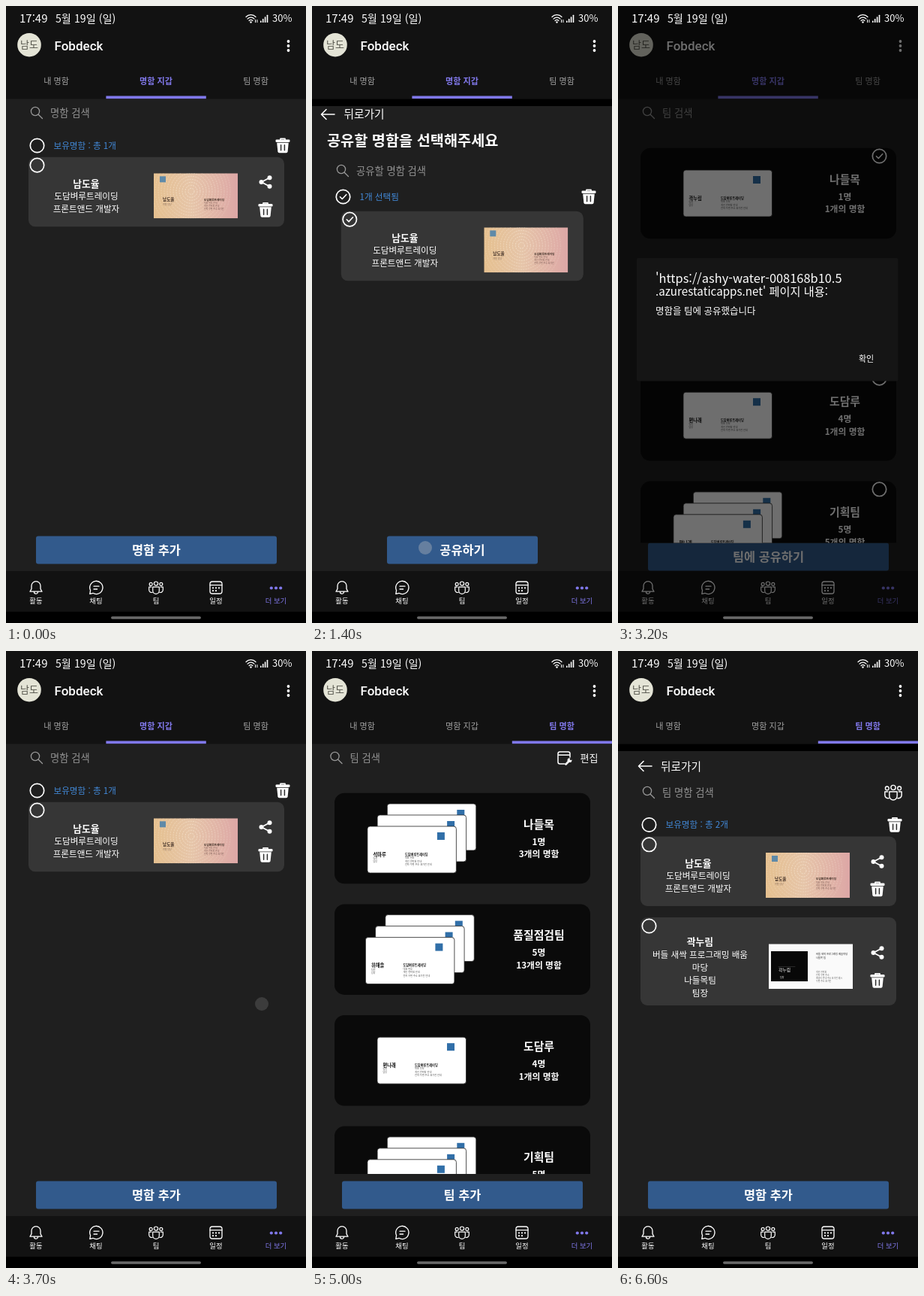
Write an HTML page that moves like this. It is 400x820 px and loops after 6.7 s.

```html
<!DOCTYPE html>
<html lang="ko">
<head>
<meta charset="utf-8">
<title>명함 지갑</title>
<style>
html, body { margin: 0; width: 100%; height: 100%; overflow: hidden; background: #1f1f1f; }
svg { display: block; }
text { font-family: "Noto Sans CJK KR", "Noto Sans CJK", "Noto Sans", sans-serif; white-space: pre; }
.latin { font-family: Roboto, "Noto Sans", sans-serif; }
</style>
</head>
<body>
<svg id="stage" width="400" height="820" viewBox="0 0 400 820"></svg>
<script>
const LOOP = 6700, STEP = 100;
const VIOLET = '#8078ea', BLUE = '#4289d8', GREY = '#929292', PAGE = '#1f1f1f', BAR = '#121212';
const COMPANY = '도담벼루트레이딩', OWNER = '남도율', LEAD = '곽누림';

// ---- drawing helpers (text y is the vertical middle) ----
const text = (x, y, s, size, { fill = '#fff', weight = 400, anchor = 'start', cls = '' } = {}) =>
  `<text x="${x}" y="${y + size * 0.36}" font-size="${size}" fill="${fill}" font-weight="${weight}" text-anchor="${anchor}" class="${cls}">${s}</text>`;
const mid = (x, y, s, size, o = {}) => text(x, y, s, size, { anchor: 'middle', ...o });
const rect = (x, y, w, h, fill, r = 0, more = '') =>
  `<rect x="${x}" y="${y}" width="${w}" height="${h}" rx="${r}" fill="${fill}" ${more}/>`;
const disc = (x, y, r, fill = '#fff') => `<circle cx="${x}" cy="${y}" r="${r}" fill="${fill}"/>`;
const line = (d, width = 1.5, color = '#fff') =>
  `<path d="${d}" fill="none" stroke="${color}" stroke-width="${width}" stroke-linecap="round" stroke-linejoin="round"/>`;
const at = (x, y, body, scale = 1) => `<g transform="translate(${x} ${y}) scale(${scale})">${body}</g>`;
const group = (id, body) => `<g id="${id}" display="none">${body}</g>`;

// ---- icons, centred on 0,0 ----
const radio = (x, y, on) => at(x, y,
  `<circle r="9.2" fill="none" stroke="#fff" stroke-width="1.7"/>` + (on ? line('M-4 .2L-1.2 3L4.2-2.8', 1.6) : ''));
const trash = (x, y) => at(x, y,
  line('M-3-8V-9.2H3V-8', 1.7) + rect(-9.5, -8, 19, 3.6, '#fff', 1.3) +
  '<path d="M-7.8-3.8H7.8L6.6 8Q6.4 9.7 4.6 9.7H-4.6Q-6.4 9.7-6.6 8Z" fill="#fff"/>' +
  line('M-2.4-.8V6.3M2.4-.8V6.3', 1.5, '#2b2b2b'));
const share = (x, y) => at(x, y,
  line('M5.5-5.7L-5.5 0L5.5 5.7', 1.8) + disc(5.5, -5.7, 3) + disc(-5.5, 0, 3) + disc(5.5, 5.7, 3));
const lens = (x, y) => at(x, y, '<circle cx="-1.5" cy="-1.5" r="5.6" fill="none" stroke="#989898" stroke-width="1.3"/>' +
  line('M2.7 2.7L8 8', 1.3, '#989898'));
const arrow = (x, y) => at(x, y, line('M9 0H-8.5M-2-6.5L-8.5 0L-2 6.5', 1.6));
const people = (x, y, scale = 1) => at(x, y,
  [-6.8, 0, 6.8].map(c => `<circle cx="${c}" cy="${c ? -4.6 : -5.4}" r="${c ? 2 : 2.6}" fill="none" stroke="#fff" stroke-width="1.2"/>`).join('') +
  line('M-4.3-.8H4.3V4A4.3 4.3 0 0 1-4.3 4ZM-6.2-.8H-9.3V3A3.6 3.6 0 0 0-5 6.4M6.2-.8H9.3V3A3.6 3.6 0 0 1 5 6.4', 1.2), scale);
const bell = at(40, 773, line('M-8 5.2H8L6 1.6V-2.4A6 6 0 0 0-6-2.4V1.6ZM-2.6 5.5A2.6 2.6 0 0 0 2.6 5.5', 1.3));
const chat = at(120, 773, line('M-8.2 8.4L-7.4 3.6A8.6 8.6 0 1 1-4 7.3ZM-3-1.8H4M-3 2H1.6', 1.3));
const calendar = at(280, 773, '<rect x="-8" y="-8" width="16" height="16" rx="3" fill="none" stroke="#fff" stroke-width="1.3"/>' +
  line('M-8-3.4H8', 1.3) + [-4, 0, 4].map(c => disc(c, 0.4, 1.1) + (c < 4 ? disc(c, 4.2, 1.1) : '')).join(''));
const editIcon = at(336, 142, line('M1 8H-5.5Q-8 8-8 5.5V-5.5Q-8-8-5.5-8H5.5Q8-8 8-5.5V-1M-8-3.8H8', 1.5) +
  line('M2.5 8.5L6.5 4.5', 2.6) + disc(7.5, 3.2, 2.9) + disc(9.2, 1.6, 1.5, PAGE));

// ---- shared parts ----
const statusBar = text(18, 16.5, '17:49', 15) + text(66, 16.5, '5월 19일 (일)', 14.2) + text(355, 16.5, '30%', 13) +
  at(326.5, 16.5, line('M-6.5-2A9 9 0 0 1 6.5-2M-4.5.6A6.3 6.3 0 0 1 4.5.6M-2.4 3A3.5 3.5 0 0 1 2.4 3', 1.2) +
    disc(0, 5, 1.2) + line('M6 2V5.2M8.4 2V5.2', 1)) +
  [0, 1, 2, 3].map(i => rect(339 + i * 2.9, 19.5 - i * 2.6, 1.6, 2.5 + i * 2.6, '#fff', 0.6)).join('');

const frameBars = rect(0, 0, 400, 123.5, BAR) + disc(31, 51.7, 15.8, '#e4e4d6') +
  mid(31, 51.7, '남도', 13, { fill: '#55554c' }) +
  text(64.5, 53, 'Fobdeck', 17, { weight: 500, cls: 'latin' }) + [47, 53, 59].map(y => disc(376.5, y, 1.9)).join('') +
  rect(0, 751, 400, 54, BAR) + rect(0, 805, 400, 15, '#000') + bell + chat + people(200, 773) + calendar +
  [353.8, 360, 366.2].map(x => disc(x, 773.5, 2.1, VIOLET)).join('') +
  ['활동', '채팅', '팀', '일정', '더 보기'].map((s, i) =>
    mid(40 + i * 80, 791, s, 9.4, { fill: i === 4 ? VIOLET : '#fff' })).join('');

const tabs = active => ['내 명함', '명함 지갑', '팀 명함'].map((s, i) =>
  mid(67 + i * 133, 100, s, 11.1, i === active ? { fill: VIOLET, weight: 700 } : { fill: '#a2a2a2' })).join('') +
  rect(active * 133.4, 119.5, 133.4, 3.7, VIOLET);

const search = (x, y, s) => lens(x, y) + text(x + 18.5, y + 0.5, s, 13.3, { fill: GREY });
const button = (x, y, w, s) => rect(x, y, w, 37, '#325a8c', 3) + mid(x + w / 2, y + 18.5, s, 16.4, { weight: 700 });
const strip = rect(0, 123.5, 400, 9.5, '#000');
const summary = (y, s, on) => radio(41.5, y, on) + text(63.5, y, s, 11.6, { fill: BLUE }) + trash(369, y);

const lines = (x, y, rows) => rows.map((s, i) => mid(x, y + i * 17, s, i ? 11.6 : 12.8, { weight: i ? 400 : 700 })).join('');
const details = (x, y, size, fill, rows) => rows.map((s, i) => text(x, y + i * size * 1.4, s, size, { fill })).join('');

// pink and sand card with faint rings
const photo = (x, y) => `<svg x="${x}" y="${y}" width="112" height="60">` +
  rect(0, 0, 112, 60, 'url(#sand)') +
  Array.from({ length: 13 }, (_, i) =>
    `<circle cx="50" cy="24" r="${4 + i * 4}" fill="none" stroke="#fff6e6" stroke-width="1" stroke-dasharray="2 1.3" opacity="${0.5 - i * 0.026}"/>`).join('') +
  rect(8, 4, 8, 8, '#5f8aa8') +
  text(12, 35, OWNER, 5.6, { fill: '#3b2a22', weight: 700 }) + details(12, 42, 3, '#8d705c', ['개발 담당']) +
  text(67, 35, COMPANY, 3.7, { fill: '#3b2a22', weight: 700 }) +
  details(67, 40, 2.9, '#805e58', ['대표 번호 안내', '개인 연락처 안내', '전자 우편 주소 표기란']) + '</svg>';

const ownCard = (x, y, w, on) => rect(x, y, w, 92.5, '#363636', 9) + radio(x + 11.5, y + 10.8, on) +
  lines(x + (w > 330 ? 77 : 85), y + 35.5, [OWNER, COMPANY, '프론트앤드 개발자']) +
  photo(x + (w > 330 ? 167 : 190.5), y + 21.5);
const tools = (y, gap) => share(346, y) + trash(346, y + gap);

// white business card; only the front one carries text
const paper = (x, y, name) => rect(x, y, 118.5, 62, '#fff', 3.5, 'stroke="#222" stroke-width=".8"') +
  rect(x + 93, y + 8, 10, 10, '#316fa8') + (name ?
    text(x + 7.5, y + 37.5, name, 6.3, { fill: '#111', weight: 700 }) + details(x + 7.5, y + 43, 3, '#555', ['팀원', '담당']) +
    text(x + 50, y + 37, COMPANY, 4.2, { fill: '#111', weight: 700 }) +
    details(x + 50, y + 42, 3.2, '#555', ['대표 번호', '개인 연락처 안내', '전자 우편 주소 표기란 안내']) : '');

const team = (i, [title, members, cards, name, stack], pick) => {
  const y = 188.8 + i * 147.6;
  const shift = i === 1 ? -2.5 : 0;
  return rect(30, y, 341, 120.5, '#0a0a0a', 13) +
    (stack ? [0, 1, 2].map(k => paper(100.3 - k * 13.2 + shift, y + 14.2 + k * 15, k === 2 && name)).join('')
           : paper(87, y + 29.2, name)) +
    mid(302.5, y + 41.5, title, 14.9, { weight: 700 }) +
    mid(302.5, y + 64.5, members + '명', 11.8, { weight: 700 }) +
    mid(302.5, y + 81.3, cards + '개의 명함', 11.8, { weight: 700 }) + (pick ? radio(348.5, y + 10.7) : '');
};
const others = [['품질점검팀', 5, 13, '위해솔', true], ['도담루', 4, 1, '편나래', false], ['기획팀', 5, 5, '편나래', true]];
const teamList = (first, bottom, pick) =>
  `<svg x="0" y="124" width="400" height="${bottom - 124}" viewBox="0 124 400 ${bottom - 124}">` +
  [first, ...others].map((row, i) => team(i, row, pick)).join('') + '</svg>';

const leadCard = rect(30, 354, 341, 117, '#363636', 9) + radio(41.5, 365.5) +
  lines(109.5, 386.5, [LEAD, '버들 새싹 프로그래밍 배움', '마당', '나들목팀', '팀장']) +
  rect(201, 389.5, 112, 59.5, '#fafafa') + rect(204, 399, 49, 40, '#080808') +
  text(214, 424, LEAD, 5.8) + line('M214 419.5H236', 0.3, '#777') + text(216, 434, '팀장', 3) +
  details(264, 403, 3.3, '#222', ['버들 새싹 프로그래밍 배움마당', '나들목 팀']) +
  details(264, 427, 2.9, '#666', ['개인 연락처', '전자 우편 주소', '배움터 안내 주소 표기란 예시', '우편 주소 표기란']) + tools(401, 37);

const dialog = rect(25, 335, 348.5, 163.5, '#151515', 2) +
  text(50, 362, "'https://ashy-water-008168b10.5", 16.4) +
  text(50, 380, ".azurestaticapps.net' 페이지 내용:", 15.2) +
  text(50, 405, '명함을 팀에 공유했습니다', 12.5) + text(321, 469.5, '확인', 11);

document.getElementById('stage').innerHTML =
  '<defs><linearGradient id="sand"><stop stop-color="#e5c08f"/><stop offset=".45" stop-color="#e6c5a9"/><stop offset="1" stop-color="#dda7a6"/></linearGradient></defs>' +
  rect(0, 0, 400, 820, PAGE) + frameBars +
  group('wallet', tabs(1) + search(40.5, 141.5, '명함 검색') + summary(185.5, '보유명함 : 총 1개') +
    ownCard(30, 200.8, 341) + tools(234, 37) + button(40, 704.5, 321, '명함 추가')) +
  group('pickCard', tabs(1) + strip + arrow(21, 144) + text(42.5, 144, '뒤로가기', 14.7) +
    text(20, 179, '공유할 명함을 선택해주세요', 19.7, { weight: 700 }) + search(40.5, 218.5, '공유할 명함 검색') +
    summary(253.5, '1개 선택됨', true) + ownCard(38.8, 272.8, 323, true) + button(100, 704.5, 201, '공유하기')) +
  group('pickTeam', tabs(1) + search(40.5, 141.5, '팀 검색') + button(40, 713.5, 321, '팀에 공유하기')) +
  group('pickList', teamList(['나들목', 1, 1, LEAD, false], 713.5, true)) +
  group('picked', at(348.5, 199.5, line('M-4 .2L-1.2 3L4.2-2.8', 1.6))) +
  group('teams', tabs(2) + search(32, 141.5, '팀 검색') + editIcon + text(357.5, 142, '편집', 13) +
    button(40, 704.5, 321, '팀 추가')) +
  group('teamsList', teamList(['나들목', 1, 3, '석마루', true], 695, false)) +
  group('detail', tabs(2) + strip + arrow(36, 153) + text(57, 153.5, '뒤로가기', 14.7) +
    search(40.5, 187.5, '팀 명함 검색') + people(367, 188, 1.2) + button(40, 704.5, 321, '명함 추가')) +
  group('detailList', summary(231, '보유명함 : 총 2개') + ownCard(30, 246.5, 341) + tools(280, 36.5) + leadCard) +
  rect(0, 0, 400, 820, '#000', 0, 'id="dim"') + statusBar + rect(140, 811.2, 120, 3.6, '#6a6a6a', 1.8) +
  group('dialog', dialog) + '<circle id="touch" r="9" fill="#c2c2c2"/>';

// ---- timeline: part, from, to ----
const spans = [
  ['wallet', 0, 900], ['pickCard', 900, 1600], ['pickTeam', 1600, 3600], ['pickList', 1800, 3600],
  ['picked', 2500, 3600], ['dialog', 3100, 3600], ['wallet', 3600, 4100], ['teams', 4100, 5400],
  ['teamsList', 4400, 5400], ['detail', 5400, LOOP], ['detailList', 5700, LOOP]
];
// press time, x, y, strength
const taps = [[700, 346, 234, 1], [1300, 151, 720, 0.5], [2300, 344, 220, 1], [2800, 205, 733, 1],
  [3500, 341, 469, 1], [4000, 333, 100, 1], [5200, 200, 255, 1]];
const fade = [0.72, 0.72, 0.18];

const part = id => document.getElementById(id);
const names = [...new Set(spans.map(s => s[0]))];
const dim = part('dim'), touch = part('touch');

function draw(t) {
  for (const id of names) {
    const on = spans.some(([n, a, b]) => n === id && t >= a && t < b);
    part(id).setAttribute('display', on ? 'inline' : 'none');
  }
  dim.setAttribute('opacity', t < 3000 || t >= 3600 ? 0 : t < 3100 ? 0.3 : 0.57);
  const tap = taps.find(([a]) => t >= a && t < a + fade.length * STEP);
  touch.setAttribute('opacity', tap ? fade[(t - tap[0]) / STEP] * tap[3] : 0);
  if (tap) {
    touch.setAttribute('cx', tap[1]);
    touch.setAttribute('cy', tap[2]);
  }
}

let shown = -1;
function tick() {
  const t = Math.floor(performance.now() % LOOP / STEP) * STEP;
  if (t !== shown) draw(shown = t);
  requestAnimationFrame(tick);
}
tick();
</script>
</body>
</html>
```
